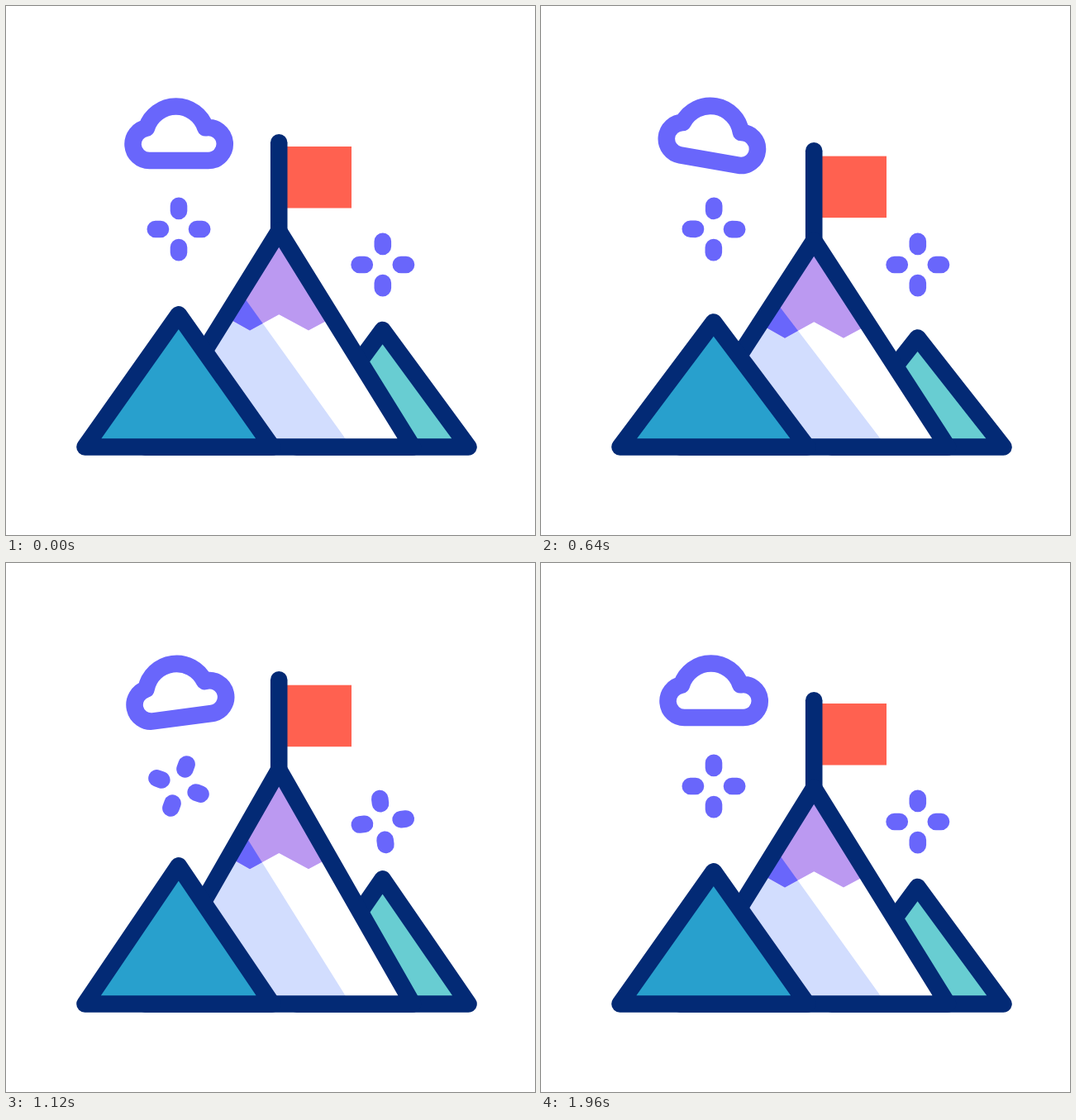
An HTML page that plays this animation: 640x640 px, repeating every 2 s.

```html
<!DOCTYPE html>
<html lang="en">
<head>
<meta charset="utf-8">
<title>Mountain summit</title>
<style>
  html, body { margin: 0; width: 100%; height: 100%; overflow: hidden; background: #fff; }
  svg { display: block; width: 100vw; height: 100vh; }
  .line { stroke: #032a75; stroke-width: 20.6; stroke-linecap: round; stroke-linejoin: round; }
  .sky { fill: none; stroke: #6966fb; stroke-width: 20.6; stroke-linecap: round; stroke-linejoin: round; }
</style>
</head>
<body>
<svg viewBox="0 0 640 640">
  <defs>
    <clipPath id="inMain"><path id="mainClip"/></clipPath>
    <clipPath id="inShade"><path id="shadeClip"/></clipPath>
    <path id="petals" d="M0-22V-28.2M0 22V28.2M-22 0H-28.2M22 0H28.2"/>
  </defs>

  <path id="cloud" class="sky" d="M173.4 187H244.8A20 20 0 1 0 241.3 147.3A37.5 37.5 0 0 0 170 147.5A19.9 19.9 0 0 0 173.4 187Z"/>
  <use id="sparkL" class="sky" href="#petals"/>
  <use id="sparkR" class="sky" href="#petals"/>

  <path id="right" class="line" fill="#68cdd2"/>
  <rect id="flag" x="332" width="86" height="74.5" fill="#ff6150"/>
  <path id="pole" class="line"/>
  <g clip-path="url(#inMain)">
    <rect width="640" height="640" fill="#fff"/>
    <path id="shade" fill="#d2ddfe"/>
    <path id="cap" fill="#bb99f1"/>
    <path id="capShade" fill="#6966fb" clip-path="url(#inShade)"/>
  </g>
  <path id="main" class="line" fill="none"/>
  <path id="left" class="line" fill="#28a0cd"/>
</svg>
<script>
const LOOP = 2000, STEP = 40, BASE = 533.5;

// Rows of [time, value]
const tracks = {
  left:   [[0, 0], [485, 14], [965, -14], [1275, 0]],
  main:   [[0, 0], [480, 16.3], [1060, -23], [1455, 0]],
  right:  [[160, 0], [620, 9.5], [1130, -9.7], [1510, 0]],
  cloud:  [[0, 0], [520, 10], [760, 10], [1260, -10], [1360, -10], [1880, 0]],
  sparkL: [[600, 0], [1880, 360]],
  sparkR: [[0, 0], [1280, 360]],
  pole:   [[0, 0], [480, -1.6], [1320, -1.6], [1960, 1]]
};

// Cubic Bezier (.545, 0, .455, 1), solved by bisection
function ease(x) {
  let lo = 0, hi = 1;
  for (let i = 0; i < 24; i++) {
    const s = (lo + hi) / 2, r = 1 - s;
    const bx = 1.635 * s * r * r + 1.365 * s * s * r + s * s * s;
    if (bx < x) lo = s; else hi = s;
  }
  return lo * lo * (3 - 2 * lo);
}

function at(name, t) {
  const keys = tracks[name];
  if (t <= keys[0][0]) return keys[0][1];
  for (let i = 1; i < keys.length; i++) {
    const [t0, a] = keys[i - 1], [t1, b] = keys[i];
    if (t < t1) return a + (b - a) * ease((t - t0) / (t1 - t0));
  }
  return keys[keys.length - 1][1];
}

const $ = id => document.getElementById(id);
const set = (id, attr, value) => $(id).setAttribute(attr, value);
const peak = (x0, x1, x2, y) => `M${x0} ${BASE}L${x1} ${y}L${x2} ${BASE}Z`;

function draw(t) {
  set('left', 'd', peak(95.5, 208.8, 322, 373.3 + at('left', t)));
  set('right', 'd', peak(351.5, 455.6, 559.5, 392 + at('right', t)));

  const d = at('main', t);
  const apex = 272.3 + d;
  const tri = peak(168, 330.2, 492, apex);
  set('main', 'd', tri);
  set('mainClip', 'd', tri);

  const rise = d > 0 ? d * 0.78 : d;
  const y = v => v + rise;
  const cap = `M200 ${y(430)}L295 ${y(392.6)}L330.3 ${y(373.2)}L366 ${y(392.6)}L440 ${y(353)}V150H200Z`
    .replace(`M200 ${y(430)}`, `M225 ${y(353)}`).replace('H200Z', 'H225Z');
  set('cap', 'd', cap);
  set('capShade', 'd', cap);

  // Shadow edge runs from the base up past the snow line
  const ex = 311 + rise * 0.05, ey = y(384.5);
  const fx = 410.3, fy = 523, k = 1.6;
  const topX = fx + (ex - fx) * k, topY = fy + (ey - fy) * k;
  const foot = fx + (fx - ex) * 0.1, footY = fy + (fy - ey) * 0.1;
  const shade = `M100 ${topY}H${topX}L${foot} ${footY}H100Z`;
  set('shade', 'd', shade);
  set('shadeClip', 'd', shade);

  set('flag', 'y', 170 + d);
  set('pole', 'd', `M330.2 ${165.3 + d + at('pole', t)}V${apex}`);

  set('cloud', 'transform', `rotate(${at('cloud', t)} 209 154)`);
  set('sparkL', 'transform', `translate(209 270) rotate(${at('sparkL', t)})`);
  set('sparkR', 'transform', `translate(455.8 313) rotate(${at('sparkR', t)})`);
}

const start = performance.now();
function tick() {
  const t = (performance.now() - start) % LOOP;
  draw(Math.floor(t / STEP) * STEP);
  requestAnimationFrame(tick);
}
tick();
</script>
</body>
</html>
```
